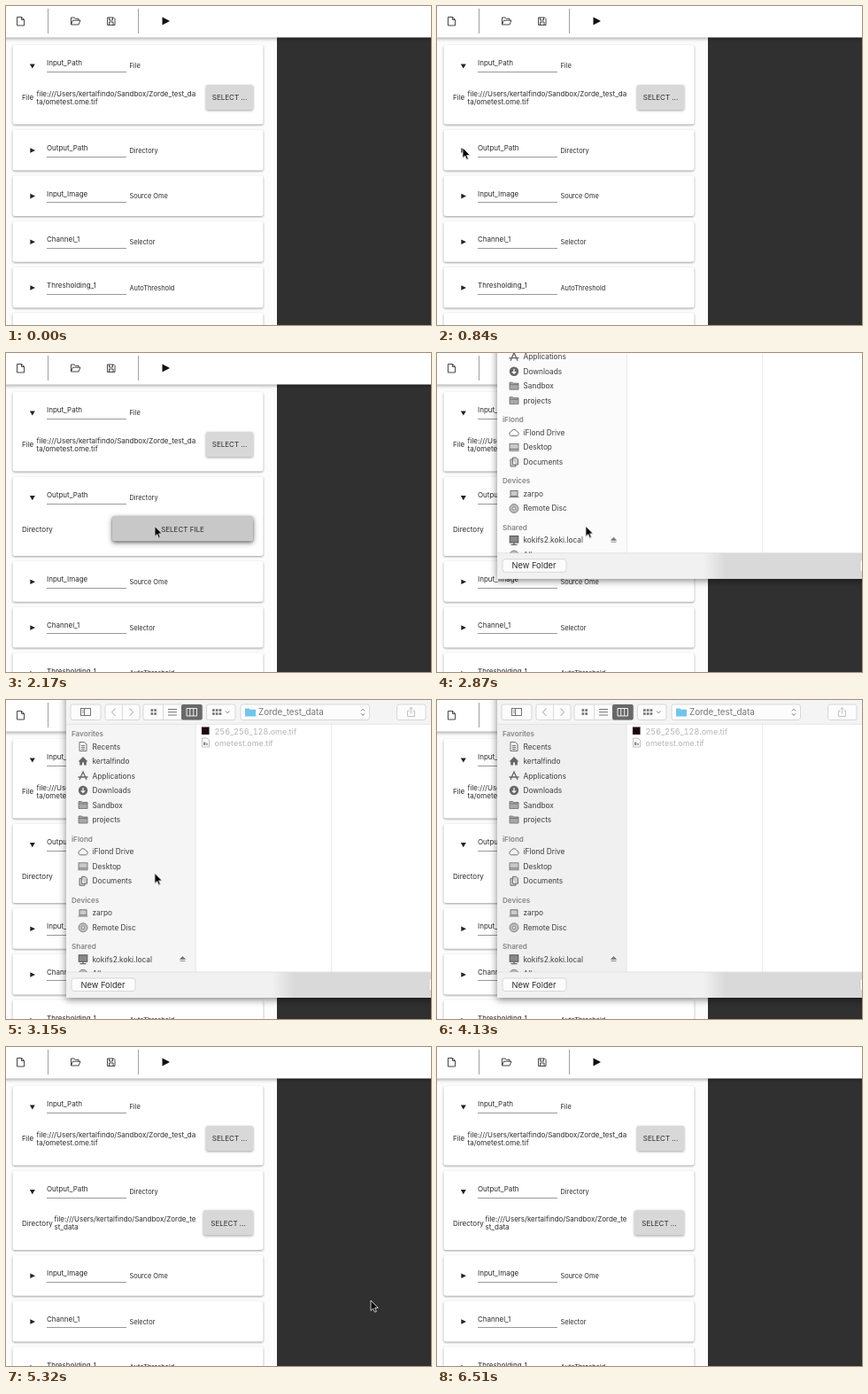
Animation of 480 by 360 pixels, one loop 6790 ms. Source, as an HTML page:

```html
<!DOCTYPE html>
<html lang="en">
<head>
<meta charset="utf-8">
<title>Workflow editor</title>
<style>
html, body { margin: 0; width: 100%; height: 100%; overflow: hidden; background: #fff; }
svg { display: block; width: 480px; height: 360px; font: 8px Inter, sans-serif; }
text { dominant-baseline: central; fill: #2b2b2b; white-space: pre; }
.mid { text-anchor: middle; }
.type { font-size: 7.4px; }
.card { fill: #fff; filter: drop-shadow(0 1px 1.3px rgba(0,0,0,.38)); }
.rule { fill: #999; shape-rendering: crispEdges; }
.btn { fill: #d8d8d8; filter: drop-shadow(0 1px 1.5px rgba(0,0,0,.38)); }
.bar { fill: #fff; filter: drop-shadow(0 1px 2px rgba(0,0,0,.4)); }
.sheet { filter: drop-shadow(0 2px 4px rgba(0,0,0,.5)); }
.side { font-size: 8.3px; fill: #3c3c3c; }
.head { font-size: 8.1px; font-weight: 600; fill: #858585; }
.file { font-size: 9px; fill: #b4b4b4; font-variant-numeric: tabular-nums; }
.label { font-size: 9.3px; }
.title { font-size: 9.8px; fill: #777; }
.ctl { fill: #fcfcfc; stroke: #cbcbcb; stroke-width: .7; }
.line { fill: none; stroke: #666; stroke-width: .9; }
.thin { fill: none; stroke: #333; stroke-width: .9; }
.off { fill: none; stroke: #bbb; stroke-width: .9; }

#low, #shut, #open, #empty, #filled, #hover, #dialog, #places, #cursor { animation: 6790ms step-end infinite; }
#low { animation-name: low; }
#shut { animation-name: shut; }
#open { animation-name: open; }
#empty { animation-name: empty; }
#filled { animation-name: filled; }
#hover { animation-name: hover; fill: #c8c8c8; filter: drop-shadow(0 2px 3px rgba(0,0,0,.45)); }
#dialog { animation-name: dialog; }
#places { animation-name: places; }
#cursor { animation-name: cursor; }

@keyframes low { 0% { transform: none } 16.49%, 100% { transform: translateY(43.7px) } }
@keyframes shut { 0% { visibility: visible } 16.49%, 100% { visibility: hidden } }
@keyframes open { 0% { visibility: hidden } 16.49%, 100% { visibility: visible } }
@keyframes empty { 0% { opacity: 1 } 76.28%, 100% { opacity: 0 } }
@keyframes filled { 0% { opacity: 0 } 76.28%, 100% { opacity: 1 } }
@keyframes hover {
  0% { opacity: 0 } 29.89% { opacity: .35 } 30.92% { opacity: .7 }
  31.95% { opacity: 1 } 42.26%, 100% { opacity: 0 }
}
@keyframes dialog {
  0% { transform: translateY(-360px) }
  40.2% { transform: translateY(-268px) }
  41.23% { transform: translateY(-172px) }
  42.26% { transform: translateY(-81.3px) }
  43.29% { transform: translateY(-22px) }
  44.32% { transform: none }
  68.03% { transform: translateY(-18px) }
  69.06% { transform: translateY(-88px) }
  70.09% { transform: translateY(-173px) }
  71.12% { transform: translateY(-262px) }
  72.15% { transform: translateY(-325px) }
  73.18%, 100% { transform: translateY(-360px) }
}
@keyframes places {
  0% { fill: #fbfbfb }
  45.36% { fill: #f9f9f9; animation-timing-function: steps(4, jump-start) }
  49.48%, 100% { fill: #f0f0f0 }
}
@keyframes cursor {
  0% { transform: translate(-40px, 160px) }
  1.02% { transform: translate(143px, 299px); animation-timing-function: steps(3) }
  4.11% { transform: translate(88px, 22px); animation-timing-function: steps(6) }
  10.3% { transform: translate(29px, 162px) }
  11.33% { transform: translate(29px, 160px) }
  18.55% { transform: translate(29px, 160px); animation-timing-function: steps(7) }
  25.76% { transform: translate(150px, 193px) }
  26.79% { transform: translate(168px, 195.5px) }
  50.5% { transform: translate(168px, 195.5px); animation-timing-function: steps(5) }
  55.66% { transform: translate(530px, 297px) }
  78.34% { transform: translate(412px, 286px); animation-timing-function: steps(3) }
  81.43% { transform: translate(282px, 246px) }
  88.65% { transform: translate(282px, 246px); animation-timing-function: steps(7) }
  95.86%, 100% { transform: translate(260px, 364px) }
}
</style>
</head>
<body>
<svg id="stage" viewBox="0 0 480 360"></svg>
<script>
const text = (x, y, s, cls = '') => `<text x="${x}" y="${y}" class="${cls}">${s}</text>`;
const rect = (x, y, w, h, attrs = '') => `<rect x="${x}" y="${y}" width="${w}" height="${h}" ${attrs}/>`;
const path = (d, attrs = 'class="line"') => `<path d="${d}" ${attrs}/>`;
const at = (x, y, body) => `<g transform="translate(${x} ${y})">${body}</g>`;

// Workflow cards
const button = (x, y, label, extra = '') =>
  rect(x, y, 279 - x, 28, 'rx="2" class="btn"') + extra + text((x + 279) / 2, y + 14.2, label, 'mid');

const card = (y, name, type, isOpen) =>
  rect(7.5, y, 283, isOpen ? 89.5 : 45.8, 'rx="2.5" class="card"') +
  path(isOpen ? 'M26.8 21.4H32.8L29.8 26.6Z' : 'M27.3 20.6L33 23.4 27.3 26.2Z', `transform="translate(0 ${y})" fill="#222"`) +
  text(46, y + 20.3, name) +
  rect(46, y + 29.9, 89.5, 1, 'class="rule"') +
  text(139.5, y + 23.6, type, 'type');

const lines = (x, y, a, b) => text(x, y, a) + text(x, y + 8.9, b);
const low = [['Input_Image', 'Source Ome'], ['Channel_1', 'Selector'],
  ['Thresholding_1', 'AutoThreshold'], ['', '']];

const panel =
  rect(0, 0, 306, 360, 'fill="#fcfcfc"') +
  card(44, 'Input_Path', 'File', true) + text(18, 103.3, 'File') +
  lines(34.5, 98.6, 'file:///Users/kertalfindo/Sandbox/Zorde_test_da', 'ta/ometest.ome.tif') +
  button(226, 89, 'SELECT ...') +
  `<g id="shut">${card(139.6, 'Output_Path', 'Directory', false)}</g>` +
  `<g id="open">${card(139.6, 'Output_Path', 'Directory', true)}${text(18, 198.7, 'Directory')}
    <g id="empty">${button(120, 184.3, 'SELECT FILE', rect(120, 184.3, 159, 28, 'rx="2" id="hover"'))}</g>
    <g id="filled">${lines(54.5, 194.3, 'file:///Users/kertalfindo/Sandbox/Zorde_te', 'st_data')}
      ${button(223, 184.3, 'SELECT ...')}</g></g>` +
  `<g id="low">${low.map(([n, t], i) => card(191.2 + i * 51.7, n, t, false)).join('')}</g>` +
  rect(306, 0, 174, 360, 'fill="#303030"');

const toolbar =
  rect(-5, -5, 490, 40.5, 'class="bar"') +
  path('M47.5 3V31M149.5 3V31', 'stroke="#888" stroke-width=".8"') +
  path('M12.5 12.5H17.5L20.5 15.5V22H12.5ZM17.5 12.5V15.5H20.5', 'class="thin"') +
  path('M73.5 21V13H77L78.2 14.3H82V16.2M73.5 21L75.5 16.2H84L82 21Z', 'class="thin"') +
  path('M114.5 13H121.5L123 14.5V21.5H114.5ZM116.5 13V16H120.5V13M116.5 21.5V18H121V21.5', 'class="thin"') +
  path('M176.5 12.5L185 17 176.5 21.5Z', 'fill="#111"');

// Folder chooser; icons are drawn around their own centre
const folder = path('M-5 -4H-1.5L-.5 -3H5V4H-5ZM-5 -1.5H5', 'fill="#a8a8a8" stroke="#6b6b6b" stroke-width=".8"');
const disc = '<circle r="5" fill="#bbb" stroke="#777" stroke-width=".8"/><circle r="1.6" fill="#eee" stroke="#777" stroke-width=".7"/>';
const icons = {
  folder, disc,
  recent: path('M-4 -5H1.5L4 -2.5V5H-4ZM-2 -1H2M-2 1H2M-2 3H2'),
  home: path('M-5.5 .5L0 -5 5.5 .5H3.8V4.5H1V1.5H-1V4.5H-3.8V.5Z', 'fill="#666"'),
  apps: path('M-4 4.5L0 -4.5 4 4.5M-5.5 1.5H5.5', 'class="line" style="stroke-width:1.3"'),
  down: '<circle r="5.2" fill="#666"/>' + path('M0 -3V2.5M-2.2 .3L0 2.5 2.2 .3', 'fill="none" stroke="#fff" stroke-width="1.2"'),
  cloud: path('M-3.5 3.5A2.5 2.5 0 0 1 -3.2 -1.3A3.3 3.3 0 0 1 3 -1.5A2.6 2.6 0 0 1 3.5 3.5Z'),
  desk: rect(-5, -4, 10, 8, 'fill="#c9c9c9" stroke="#6b6b6b" stroke-width=".8"') + path('M-5 2H5'),
  docs: path('M-1.5 -5H2.5L4.5 -3V3H-1.5ZM-1.5 -3H-4V5H2V3', 'fill="#ccc" stroke="#666" stroke-width=".9"'),
  laptop: rect(-4, -3.5, 8, 6, 'fill="#ccc" stroke="#666" stroke-width=".9"') + path('M-5.5 3.7H5.5'),
  server: rect(-4.8, -5, 9.6, 7.5, 'fill="#888" stroke="#555"') + path('M-3.5 4.8H3.5M0 2.5V4.8', 'class="line" style="stroke-width:1.3"')
};
const places = [
  ['Favorites', 38, 'Recents', 'recent', 'kertalfindo', 'home', 'Applications', 'apps',
    'Downloads', 'down', 'Sandbox', 'folder', 'projects', 'folder'],
  ['iFlond', 156.8, 'iFlond Drive', 'cloud', 'Desktop', 'desk', 'Documents', 'docs'],
  ['Devices', 225.8, 'zarpo', 'laptop', 'Remote Disc', 'disc'],
  ['Shared', 278.3, 'kokifs2.koki.local', 'server', 'All...', 'disc']
];
const group = ([title, y, ...items]) => {
  let out = text(74, y, title, 'head');
  for (let i = 0; i < items.length; i += 2) {
    const row = y + 14.5 + i * 8.25;
    out += at(87, row, icons[items[i + 1]]) + text(97.5, row, items[i], 'side');
  }
  return out;
};

const ctl = (x, w) => rect(x, 5, w, 17.5, 'rx="2.5" class="ctl"');
const dots = (x, n) => Array.from({ length: n * 2 }, (_, i) =>
  rect(x + (i >> 1) * 3.8, 10.2 + (i % 2) * 4, 2.7, 2.7, 'fill="#777"')).join('');
const chevrons = (x, y) => path(`M${x - 2} ${y - 1.5}l2 -2 2 2M${x - 2} ${y + 1.5}l2 2 2 -2`);

const header =
  ctl(73, 34) + rect(84.5, 9.5, 11, 8, 'class="line"') + path('M88.5 9.5V17.5M86 12H87.5M86 14H87.5') +
  ctl(112, 39) + path('M131.5 5V22.5', 'stroke="#ccc" stroke-width=".7"') +
  path('M123.5 9.5L119.5 13.7 123.5 18M139.5 9.5L143.5 13.7 139.5 18', 'fill="none" stroke="#bbb" stroke-width="1.1"') +
  ctl(155, 67) + path('M177.5 5V22.5', 'stroke="#ccc" stroke-width=".7"') + dots(163.5, 2) +
  path('M183 10.5H193M183 13.7H193M183 17H193') +
  rect(198, 5, 23.7, 17.5, 'rx="2" fill="#686868"') +
  path('M204 9.5H215.5V18H204ZM207.8 9.5V18M211.7 9.5V18', 'fill="none" stroke="#fff" stroke-width=".9"') +
  ctl(226.5, 32.5) + dots(233, 3) + path('M248 12.5l2.2 2.2 2.2 -2.2') +
  ctl(265, 145.5) + path('M270 9.5H274.5L275.7 10.7H282V18.5H270Z', 'fill="#73c4ea"') +
  text(285, 13.8, 'Zorde_test_data', 'title') + chevrons(403, 13.8) +
  ctl(441.5, 32.5) + path('M455.5 12.2H453.5V18.5H461.5V12.2H459.5M457.5 15.5V8.5M455.3 10.5L457.5 8.3 459.7 10.5', 'class="off"');

const files =
  rect(221, 30.5, 8.5, 8.5, 'fill="#1c0710" stroke="#777" stroke-width=".4"') +
  text(235.5, 35.2, '256_256_128.ome.tif', 'file') +
  path('M221.5 43H227L229.5 45.5V53H221.5Z', 'fill="#fafafa" stroke="#aaa" stroke-width=".7"') +
  rect(223, 47.5, 2.3, 3.5, 'fill="#888"') + rect(226, 48.5, 2, 2.5, 'fill="#aaa"') +
  text(235.5, 48.6, 'ometest.ome.tif', 'file');

const dialog =
  rect(68, -20, 440, 356, 'fill="#f4f4f4" class="sheet"') +
  rect(68, 307, 412, 29, 'fill="url(#tint)"') +
  rect(68, 27, 146, 280, 'id="places"') + rect(214, 27, 266, 280, 'fill="#fff"') +
  path('M68 27.3H480M68 307H480', 'stroke="#dcdcdc" stroke-width=".7"') +
  path('M214.3 27V307M367.7 27V307', 'stroke="#e0e0e0" stroke-width=".7"') +
  `<g clip-path="url(#list)">${places.map(group).join('')}</g>` +
  path('M196.5 292.5L199.5 289.5 202.5 292.5ZM196.5 294.5H202.5', 'fill="#777" stroke="#777" stroke-width=".8"') +
  header + files +
  rect(74, 314, 72, 14.5, 'rx="3" class="ctl"') + text(109.5, 321.3, 'New Folder', 'mid label') +
  rect(478, 314, 30, 14.5, 'rx="3" class="ctl"');

document.getElementById('stage').innerHTML = `
  <defs>
    <linearGradient id="tint" gradientUnits="userSpaceOnUse" x1="300" x2="326" y1="0" y2="0">
      <stop stop-color="#f1f1f1"/><stop offset="1" stop-color="#d9d9d9"/>
    </linearGradient>
    <clipPath id="list">${rect(68, 27, 146, 280)}</clipPath>
  </defs>
  ${panel}${toolbar}
  <g id="dialog">${dialog}</g>
  <g id="cursor">${path('M0 0V11.5L2.7 9.1 4.5 13.2 6.4 12.4 4.6 8.4H8.3Z',
    'fill="#000" stroke="#fff" stroke-width=".8" style="filter:drop-shadow(0 .7px .7px rgba(0,0,0,.4))"')}</g>`;
</script>
</body>
</html>
```
